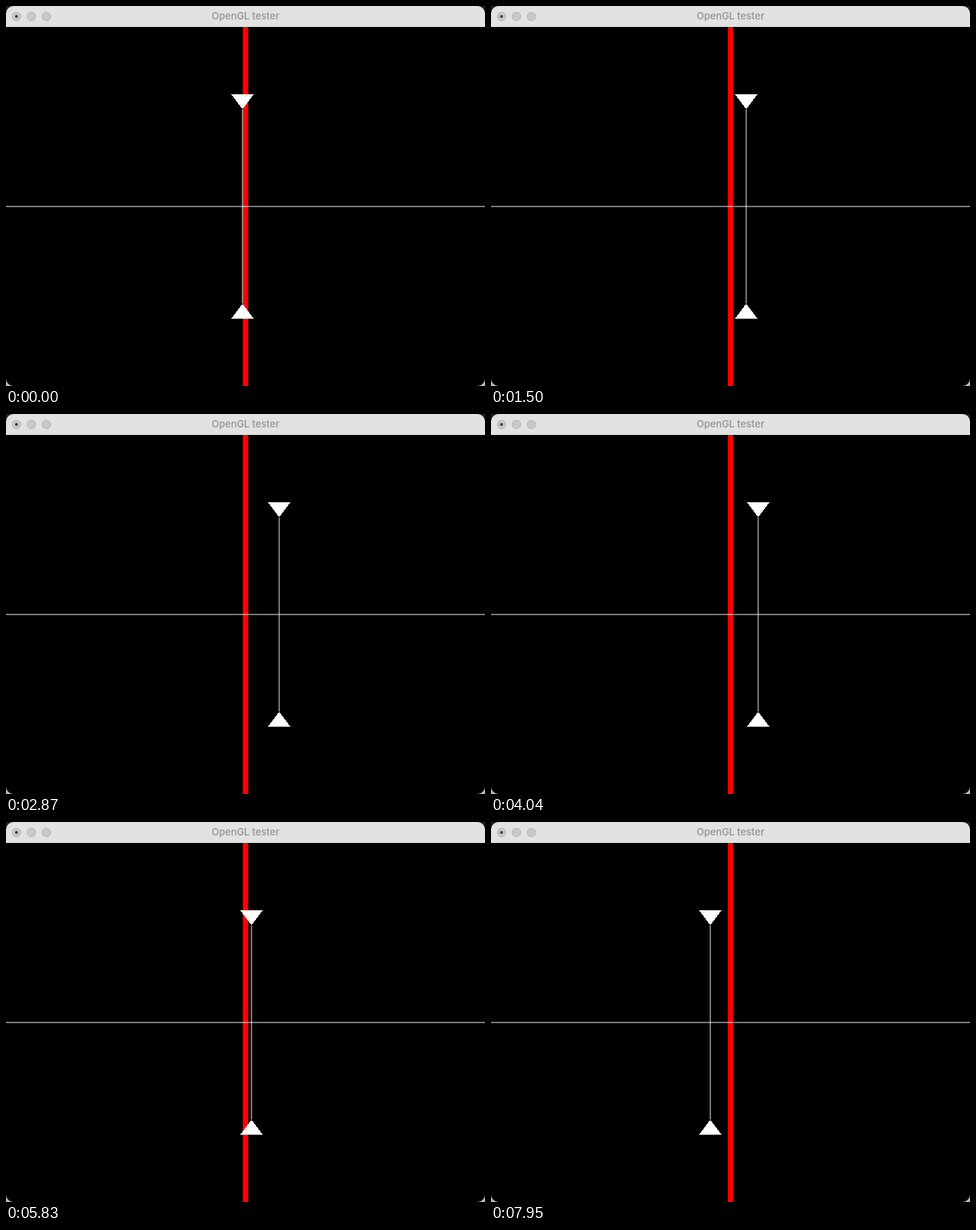
Recreate the animation shown at these times as an HTML page. Size 640 px wide and 508 px high, loop 8 s.

```html
<!DOCTYPE html>
<html lang="en">
<head>
<meta charset="utf-8">
<title>OpenGL tester</title>
<style>
  html, body { margin: 0; height: 100%; overflow: hidden; }
  body { background: linear-gradient(#222 50%, #bbb 50%); }
  svg { display: block; width: 640px; height: 508px; }
  text { font: 600 13px Inter, sans-serif; fill: #9b9b9b; text-anchor: middle; }
</style>
</head>
<body>
<svg viewBox="0 0 640 508">
  <clipPath id="window"><rect width="640" height="508" rx="10"/></clipPath>
  <g clip-path="url(#window)">
    <rect width="640" height="508" fill="#000"/>
    <rect width="640" height="28" fill="#e2e2e2"/>
    <g fill="#c8c8c8" stroke="#b4b4b4">
      <circle cx="14" cy="14" r="5.7"/>
      <circle cx="34" cy="14" r="5.7"/>
      <circle cx="54" cy="14" r="5.7"/>
    </g>
    <circle cx="14" cy="14" r="2" fill="#444"/>
    <text x="320" y="18">OpenGL tester</text>

    <rect x="316" y="28" width="8" height="480" fill="#f00" opacity=".6"/>
    <rect x="317" y="28" width="6" height="480" fill="#f00"/>
    <rect y="267" width="640" height="2" fill="#fff" opacity=".47"/>
    <g id="caliper" fill="#fff" shape-rendering="crispEdges">
      <rect x="-1" y="138" width="2" height="260" opacity=".47"/>
      <path d="M-15 118H15L0 138ZM-15 418H15L0 398Z"/>
    </g>
  </g>
</svg>
<script>
  const LOOP = 8000;
  // [time in ms, x]: drifts right, bounces, drifts back past the red bar
  const path = [
    [0, 316], [1500, 341], [2500, 359], [2870, 365], [3230, 371], [4040, 357],
    [4160, 356], [4950, 343], [5040, 341], [6620, 316], [7500, 302], [7950, 293], [LOOP, 293]
  ];
  const caliper = document.getElementById('caliper');

  function positionAt(time) {
    const next = path.findIndex(([t]) => t > time);
    const [t0, x0] = path[next - 1];
    const [t1, x1] = path[next];
    return Math.round(x0 + (x1 - x0) * (time - t0) / (t1 - t0));
  }

  function draw() {
    const x = positionAt(performance.now() % LOOP);
    caliper.setAttribute('transform', `translate(${x} 0)`);
    requestAnimationFrame(draw);
  }
  draw();
</script>
</body>
</html>
```
